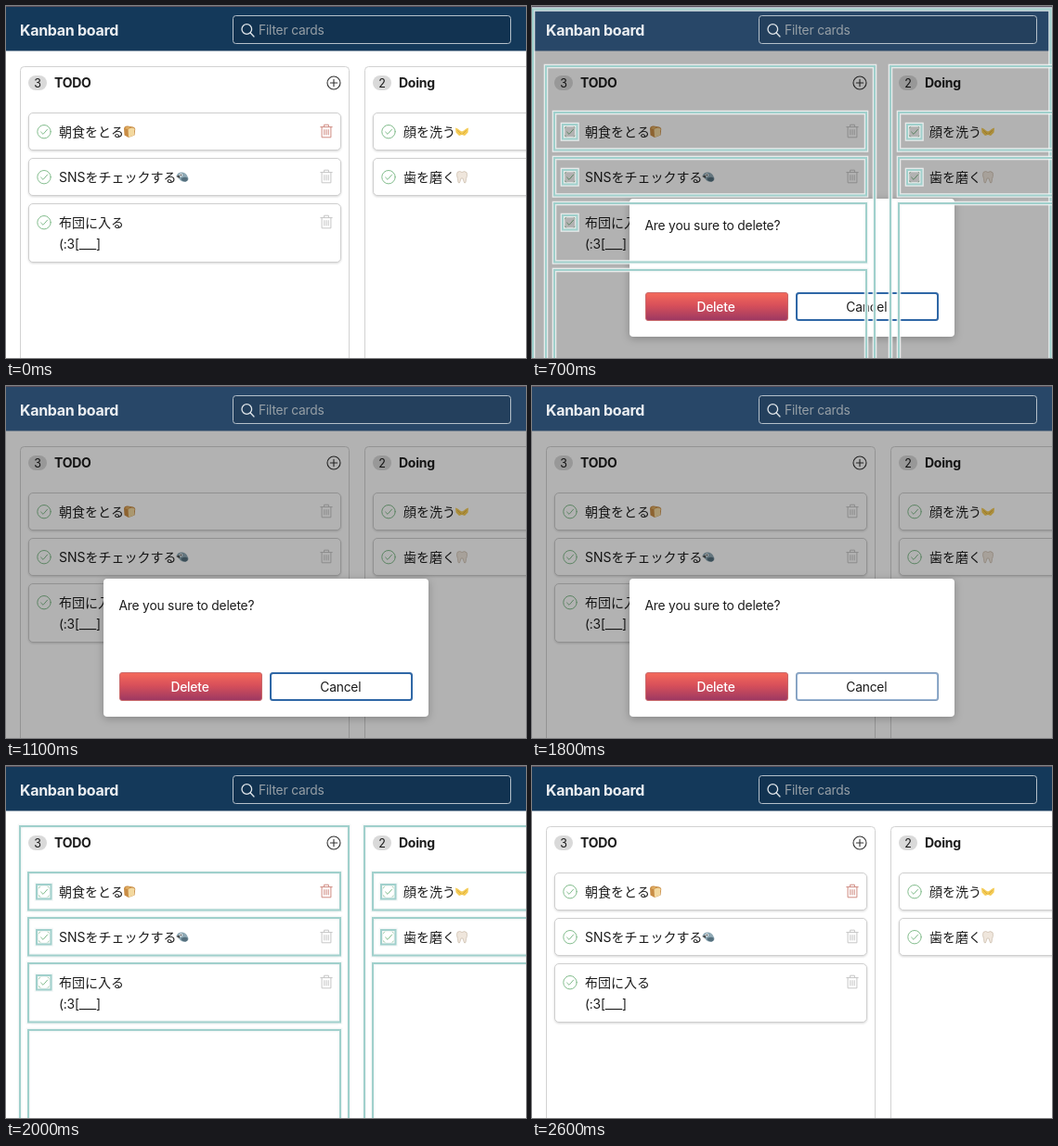
Recreate the animation shown at these times as an HTML page. Size 560 by 380 pixels, loop 2.9 s.

```html
<!DOCTYPE html>
<html lang="ja">
<head>
<meta charset="utf-8">
<title>Kanban board</title>
<style>
  html, body { margin: 0; width: 100%; height: 100%; overflow: hidden; background: #fff; }
  svg { display: block; width: 560px; height: 380px; }
  text {
    font: 400 13.8px Inter, "Noto Sans CJK JP", "Noto Sans CJK", sans-serif;
    letter-spacing: -.2px; fill: #1c1c1c; white-space: pre;
  }
  .ja { font-size: 14px; letter-spacing: 0; }
  .bold { font-weight: 700; font-size: 14px; letter-spacing: -.25px; }
  .title { font-weight: 700; font-size: 16px; letter-spacing: -.3px; fill: #eceff2; }
  .mid { text-anchor: middle; }
  .line { fill: none; stroke-linecap: round; stroke-linejoin: round; }
  .card { fill: #fff; stroke: #cfcfcf; filter: drop-shadow(0 1px 1px rgba(0,0,0,.16)); }
</style>
</head>
<body>
<svg id="stage" viewBox="0 0 560 380">
  <defs>
    <linearGradient id="red" x2="0" y2="1">
      <stop offset="0" stop-color="#f5695a"/>
      <stop offset=".45" stop-color="#d8505a"/>
      <stop offset="1" stop-color="#9c3862"/>
    </linearGradient>
    <g id="check" class="line" stroke="#83bd8d">
      <circle r="7.2"/><path d="M-3.4 .3L-1 2.7L3.6 -2.6"/>
    </g>
    <g id="trash" class="line">
      <path d="M-6.2 -4.6H6.2M-2.4 -4.8V-7H2.4V-4.8M-4.9 -4.4V6.6H4.9V-4.4M-2.2 -1.6V3.8M0 -1.6V3.8M2.2 -1.6V3.8"/>
    </g>
    <g id="bread">
      <path d="M-6 -3.5Q-5.5 -6.5 -2 -6L4 -5Q7 -4 6 -1L5.5 4L-1 6.5L-5.5 4Z" fill="#c98d45"/>
      <path d="M-1.5 -2.5Q2 -5 5 -3.5Q6.5 -2 5 -.5L5 4L-1 6.2Z" fill="#f3d9a0"/>
      <path d="M-5 -3.5Q-3 -5.5 1 -4.8L-2 -2.8Z" fill="#e5b468"/>
    </g>
    <g id="bird">
      <path d="M-6.5 -1Q-5 -5.5 0 -5Q4 -4.5 5.5 -.5Q8 3 4 5Q-1 6 -3.5 2Z" fill="#8fa9b5"/>
      <path d="M-2 2Q2 -1 5.5 1Q6.5 4 3.5 5Q0 5.5 -2 2Z" fill="#55707e"/>
      <path d="M-6.8 -.5L-3 -2L-3 1.5Z" fill="#4a4a4a"/>
      <circle cx="-1.6" cy="-2" r="1.7" fill="#eef3f4"/><circle cx="-1.6" cy="-2" r=".8" fill="#222"/>
    </g>
    <g id="hands">
      <path d="M-7 -4L-4.5 -3L-2 -1L0 0L2 -1L4.5 -3L7 -4L6.5 1L3 4.5L0 3.5L-3 4.5L-6.5 1Z" fill="#f4cb55"/>
      <path d="M-4.5 -1L-1 2.5M4.5 -1L1 2.5" class="line" stroke="#d9a53a" stroke-width=".8"/>
    </g>
    <g id="tooth">
      <path d="M-5 -5Q-2.5 -7 0 -5Q3 -7 5.2 -4.6Q6.2 -1 4.5 2L4 6Q2.6 7.5 2 5L1 1.5H-1L-2 5Q-2.6 7.5 -4 6L-4.5 2Q-6.2 -2 -5 -5Z" fill="#efe6dc" stroke="#cfc0b2" stroke-width=".8"/>
    </g>
  </defs>
  <g id="board"></g>
  <g id="ring">
    <rect x="338" y="128" width="14.5" height="14.5" rx="2.5" fill="#e3e8f8" stroke="#37509c" stroke-width="2"/>
    <use href="#trash" stroke="#b9808c" transform="translate(345.2 135.4) scale(.75)"/>
  </g>
  <g id="dim"><rect y="48" width="560" height="332" fill="#000" opacity=".3"/></g>
  <g id="header">
    <rect id="bar" width="560" height="48.5"/>
    <rect width="560" height="1" fill="#59505c"/>
    <text class="title" x="15" y="32">Kanban board</text>
    <rect x="244.5" y="10.5" width="299" height="30" rx="3" fill="#000" fill-opacity=".1" stroke="#b5c0ca"/>
    <g class="line" stroke="#e2e7eb" stroke-width="1.3">
      <circle cx="259.3" cy="25" r="5.3"/><path d="M263.2 29L267 33"/>
    </g>
    <text x="272" y="31" style="fill:#969fa6">Filter cards</text>
  </g>
  <g id="modal">
    <rect x="105" y="208" width="350" height="149" rx="4" fill="#fff" style="filter:drop-shadow(0 2px 4px rgba(0,0,0,.25))"/>
    <text x="121.5" y="242">Are you sure to delete?</text>
    <rect x="122.5" y="309.5" width="153" height="30" rx="2.5" fill="url(#red)" stroke="#c9686a"/>
    <text class="mid" x="198" y="330" style="fill:#fff;font-weight:500">Delete</text>
    <rect x="284.5" y="309.5" width="153" height="30" rx="2.5" fill="#fff" stroke="#d0d0d0"/>
    <rect id="focus" x="285" y="310" width="152" height="29" rx="2.5" fill="none" stroke="#2f67a6" stroke-width="2"/>
    <text class="mid" x="360.3" y="330">Cancel</text>
  </g>
  <g id="marks" fill="none"></g>
</svg>
<script>
const LOOP = 2900;
const $ = id => document.getElementById(id);

const columns = [
  { x: 15, count: 3, name: "TODO", cards: [
    { y: 115, h: 41, lines: ["朝食をとる"], icon: "bread", end: 133 },
    { y: 164, h: 41, lines: ["SNSをチェックする"], icon: "bird", end: 190 },
    { y: 213, h: 64, lines: ["布団に入る", "(:3[___]"] } ] },
  { x: 386, count: 2, name: "Doing", cards: [
    { y: 115, h: 41, lines: ["顔を洗う"], icon: "hands", end: 491 },
    { y: 164, h: 41, lines: ["歯を磨く"], icon: "tooth", end: 491 } ] }
];

const use = (id, x, y, extra = "") => `<use href="#${id}" transform="translate(${x} ${y})" ${extra}/>`;

function cardSvg(x, card, hot) {
  const mid = card.y + 20.7;
  return `<rect class="card" x="${x + 9.5}" y="${card.y + .5}" width="336" height="${card.h - 1}" rx="4.5"/>`
    + use("check", x + 26, mid)
    + card.lines.map((s, i) => `<text class="${i ? "" : "ja"}" x="${x + 42}" y="${card.y + 26 + i * 23}">${s}</text>`).join("")
    + (card.icon ? use(card.icon, card.end, mid - .2) : "")
    + use("trash", x + 330, mid - .5, hot ? 'id="hot"' : 'stroke="#c6c6c6"');
}

function columnSvg(col, c) {
  const { x } = col;
  return `<rect x="${x + .5}" y="65.5" width="354" height="340" rx="4" fill="#fff" stroke="#d2d2d2"/>
    <rect x="${x + 9}" y="75" width="20" height="16" rx="8" fill="#d9d9d9"/>
    <text class="mid" x="${x + 19}" y="87.5" style="font-size:12.5px">${col.count}</text>
    <text class="bold" x="${x + 37}" y="88">${col.name}</text>
    <g class="line" stroke="#333" stroke-width="1.1" transform="translate(${x + 338} 83)">
      <circle r="7"/><path d="M-3.7 0H3.7M0 -3.7V3.7"/></g>`
    + col.cards.map((card, i) => cardSvg(x, card, !c && !i)).join("");
}

// Outlines flashed around every re-rendered part
const mark = (x, y, w, h, id = "") => `<g ${id && `id="${id}"`}>`
  + [["#f2f6f6", 4.6, .85], ["#a0d0cc", 2, 1]].map(([color, width, alpha]) =>
    `<rect x="${x}" y="${y}" width="${w}" height="${h}" stroke="${color}" stroke-width="${width}" opacity="${alpha}"/>`).join("")
  + "</g>";

function marksSvg({ x, cards }) {
  const last = cards[cards.length - 1];
  return mark(x, 65, 354, 340)
    + cards.map(({ y, h }) => mark(x + 9, y, 336, h - .5) + mark(x + 18, y + 13, 15.5, 15.5)).join("")
    + mark(x + 9, last.y + last.h + 8, 336, 200);
}

$("board").innerHTML = '<rect width="560" height="380" fill="#fff"/>' + columns.map(columnSvg).join("");
$("marks").innerHTML = mark(1, 3.5, 557.5, 400, "page") + columns.map(marksSvg).join("");

const show = (id, on) => $(id).setAttribute("opacity", +on);

function draw(t) {
  const within = (a, b) => t >= a && t < b;
  const open = within(700, 2000);
  show("modal", open);
  show("dim", open);
  $("bar").setAttribute("fill", open ? "#284768" : "#14395a");
  $("hot").setAttribute("stroke", open ? "#c6c6c6" : "#cf8a80");
  show("ring", within(500, 600) ? .5 : within(600, 700));
  show("focus", within(1800, 1900) ? .5 : t < 1800);
  if (!open) show("focus", 0);
  show("marks", within(700, 1000) || within(2000, 2300));
  show("page", open);
}

function tick() {
  draw(performance.now() % LOOP);
  requestAnimationFrame(tick);
}
tick();
</script>
</body>
</html>
```
